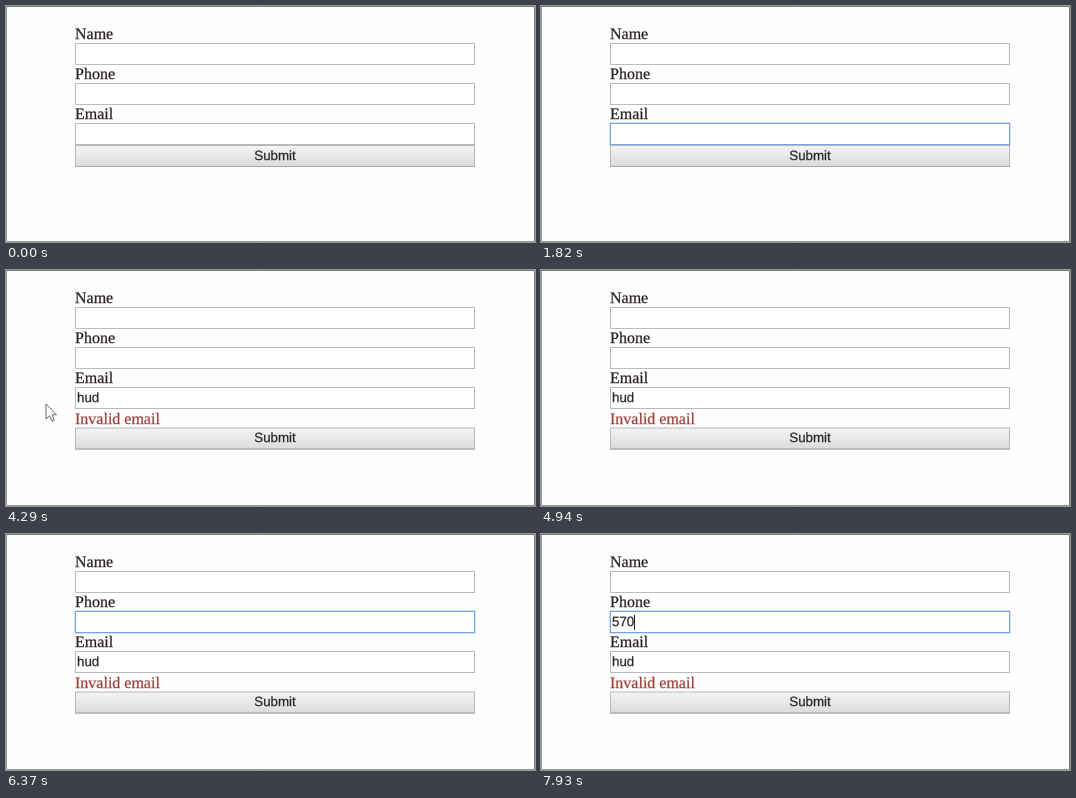
An HTML page that plays this animation: 529x236 px, repeating every 8 s.

```html
<!DOCTYPE html>
<html lang="en">
<head>
<meta charset="utf-8">
<title>Form validation</title>
<style>
  html, body { margin: 0; width: 100%; height: 100%; overflow: hidden; background: #fefefe; }
  svg { display: block; width: 529px; height: 236px; }
  text { stroke-width: .25px; text-rendering: geometricPrecision; }
  .label { font: 16px "Liberation Serif", "Times New Roman", serif; fill: #2a2222; stroke: #2a2222; }
  .value { font: 13.333px "Liberation Sans", Arial, sans-serif; fill: #2a2626; stroke: #2a2626; }
  .error { fill: #9b423c; stroke: #9b423c; }
  .box { fill: #fff; stroke: #bababa; }
  .focus { stroke: #78a4dc; }
  .glow { fill: none; stroke: #8fb6e8; stroke-opacity: .4; }
  .edge { fill: none; stroke: #777; }
  .side { stroke: #999; }
</style>
</head>
<body>
<svg viewBox="0 0 529 236">
  <defs>
    <linearGradient id="face" x2="0" y2="1">
      <stop stop-color="#f4f4f4"/>
      <stop offset="1" stop-color="#dcdcdc"/>
    </linearGradient>
  </defs>
  <path class="edge side" d="M.5 0V235.5H529"/>
  <path class="edge" d="M0 .5H528.5V236"/>
  <g id="fields"></g>
  <text id="error" class="label error" x="69" y="154.4">Invalid email</text>
  <g id="submit">
    <rect x="69.5" y="139.5" width="399" height="21" fill="url(#face)" stroke="#b8b8b8"/>
    <path d="M69 160.5H469" stroke="#a6a6a6"/>
    <text class="value" x="269" y="153.5" text-anchor="middle">Submit</text>
  </g>
  <path id="arrow" d="M0 0V15L3.5 11.8L6 17.2L8.3 16.2L6 10.8H10.5Z" fill="#fff" stroke="#666"/>
</svg>
<script>
const LOOP = 8000, BLINK = 500, CHAR = 7.415;
const BLUR = 4160;

// Each field: focus span, typed text and the time of each key press.
const fields = [
  { label: "Name", y: 37 },
  { label: "Phone", y: 77, focus: [5720, LOOP], text: "570", keys: [7540, 7670, 7800] },
  { label: "Email", y: 117, focus: [1170, BLUR], text: "hud", keys: [2990, 3120, 3250] }
];

// Pointer path: time, x, y
const path = [[3770, 100, 128], [4100, 40, 134], [4680, 40, 134], [4940, 66, 94]];

const $ = id => document.getElementById(id);
const show = (el, on) => el.setAttribute("visibility", on ? "visible" : "hidden");

function add(parent, tag, attrs, text = "") {
  const el = document.createElementNS("http://www.w3.org/2000/svg", tag);
  for (const key in attrs) el.setAttribute(key, attrs[key]);
  el.textContent = text;
  return parent.appendChild(el);
}

for (const f of fields) {
  const g = $("fields");
  add(g, "text", { class: "label", x: 69, y: f.y - 3.6 }, f.label);
  f.box = add(g, "rect", { class: "box", x: 69.5, y: f.y + .5, width: 399, height: 21 });
  f.glow = add(g, "rect", { class: "glow", x: 68.5, y: f.y - .5, width: 401, height: 23, rx: 1 });
  f.value = add(g, "text", { class: "value", x: 71, y: f.y + 15.3 });
  f.caret = add(g, "rect", { y: f.y + 4, width: 1, height: 15, fill: "#222" });
}

function drawField(f, t) {
  const focused = !!f.focus && t >= f.focus[0] && t < f.focus[1];
  const pressed = f.keys ? f.keys.filter(k => k <= t) : [];
  const since = pressed.length ? pressed[pressed.length - 1] : focused ? f.focus[0] : 0;
  f.box.classList.toggle("focus", focused);
  show(f.glow, focused);
  f.value.textContent = f.text ? f.text.slice(0, pressed.length) : "";
  f.caret.setAttribute("x", Math.round(71 + pressed.length * CHAR));
  show(f.caret, focused && Math.floor((t - since) / BLINK) % 2 === 0);
}

function drawPointer(t) {
  const i = path.findIndex((p, n) => n < path.length - 1 && t >= p[0] && t < path[n + 1][0]);
  show($("arrow"), i >= 0);
  if (i < 0) return;
  const [a, b] = [path[i], path[i + 1]];
  const u = (t - a[0]) / (b[0] - a[0]), e = u * u * (3 - 2 * u);
  const at = n => a[n] + (b[n] - a[n]) * e;
  $("arrow").setAttribute("transform", `translate(${at(1)} ${at(2)})`);
}

function draw(now) {
  const t = now % LOOP, invalid = t >= BLUR;
  fields.forEach(f => drawField(f, t));
  show($("error"), invalid);
  $("submit").setAttribute("transform", `translate(0 ${invalid ? 18.5 : 0})`);
  drawPointer(t);
}

const start = performance.now();
function tick() {
  draw(performance.now() - start);
  requestAnimationFrame(tick);
}
tick();
</script>
</body>
</html>
```
